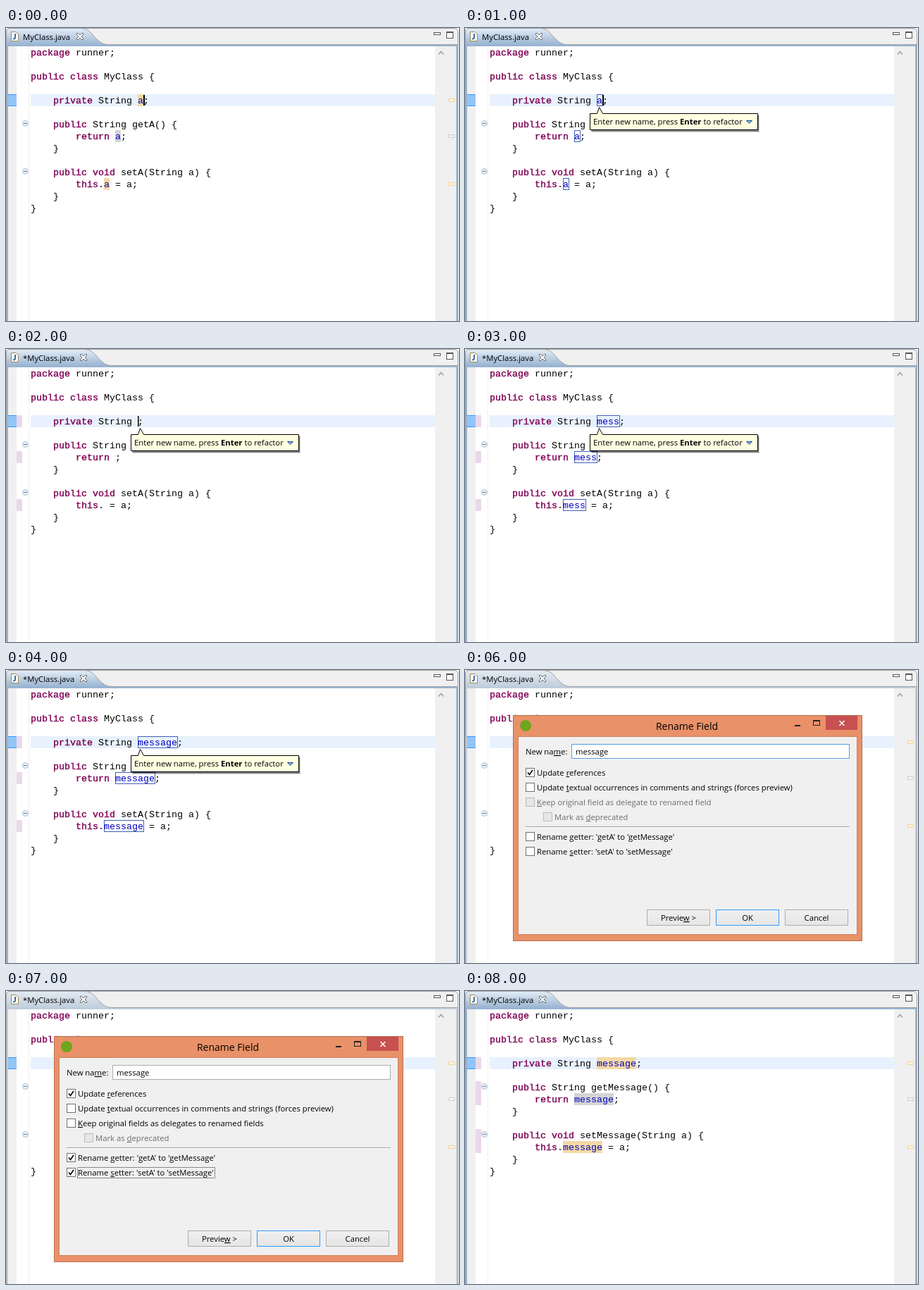
Recreate the animation shown at these times as an HTML page. Size 643x416 px, loop 9 s.

```html
<!DOCTYPE html>
<html lang="en">
<head>
<meta charset="utf-8">
<title>Rename field</title>
<style>
  html, body { margin: 0; width: 100%; height: 100%; overflow: hidden; background: #fff; }
  svg { display: block; width: 643px; height: 416px; }
  text { white-space: pre; }
  .code { font: 13.333px "Liberation Mono", "Courier New", monospace; }
  .kw { fill: #7f0055; stroke: #7f0055; stroke-width: .4px; }
  .field { fill: #0000c0; }
  .ui { font: 11.3px "Open Sans", "Segoe UI", sans-serif; }
</style>
</head>
<body>
<svg id="stage" viewBox="0 0 643 416"></svg>
<script>
const stage = document.getElementById('stage');
const LOOP = 9000, LEFT = 35, TOP = 26, CHAR = 8, LINE = 17;
const KEYWORDS = /\b(package|public|class|private|return|void|this)\b/g;

// '@' stands for the field being renamed
const codeLines = (getter, setter) => [
  'package runner;', '',
  'public class MyClass {', '',
  '    private String @;', '',
  `    public String ${getter}() {`,
  '        return @;',
  '    }', '',
  `    public void ${setter}(String a) {`,
  '        this.@ = a;',
  '    }',
  '}'
];

const base = { name: 'a', getter: 'getA', setter: 'setA', dirty: true, active: true, changed: [] };
const editing = { ...base, boxes: true, tip: true, changed: [4, 7, 11] };
const dialog = { ...base, active: false, marks: true, dialog: true };
const steps = [
  [0, { ...base, dirty: false, marks: true, caret: true }],
  [1000, { ...editing, dirty: false, changed: [], caret: true }],
  [2000, { ...editing, name: '', caret: true }],
  [3000, { ...editing, name: 'mess' }],
  [4000, { ...editing, name: 'message' }],
  [6000, dialog],
  [7000, { ...dialog, accessors: true }],
  [8000, { ...base, name: 'message', getter: 'getMessage', setter: 'setMessage',
           marks: true, changed: [4, 6, 7, 10, 11] }]
];

const lineTop = i => TOP + LINE * i;
const rect = (x, y, w, h, fill, extra = '') =>
  `<rect x="${x}" y="${y}" width="${w}" height="${h}" fill="${fill}" ${extra}/>`;
const frame = (x, y, w, h, fill, stroke, extra = '') =>
  rect(x + .5, y + .5, w - 1, h - 1, fill, `stroke="${stroke}" ${extra}`);
const path = (d, stroke, fill = 'none', width = 1) =>
  `<path d="${d}" fill="${fill}" stroke="${stroke}" stroke-width="${width}"/>`;
const label = (x, y, s, extra = '') => `<text class="ui" x="${x}" y="${y}" ${extra}>${s}</text>`;
// '_' underlines the letter after it
const mnemonic = s => s.replace(/_(.)/, '<tspan text-decoration="underline">$1</tspan>');

const defs = `<defs>
  <linearGradient id="on" x2="0" y2="1"><stop stop-color="#e4edf7"/><stop offset="1" stop-color="#99b4d1"/></linearGradient>
  <linearGradient id="off" x2="0" y2="1"><stop stop-color="#e4ebf3"/><stop offset="1" stop-color="#bfcddb"/></linearGradient>
  <linearGradient id="btn" x2="0" y2="1"><stop stop-color="#f0f0f0"/><stop offset="1" stop-color="#e5e5e5"/></linearGradient>
  <pattern id="check" width="2" height="2" patternUnits="userSpaceOnUse">
    <path d="M0 0h2v2h-2z" fill="#f0f0f0"/><path d="M0 0h1v1h-1zM1 1h1v1h-1z" fill="#3399ff"/>
  </pattern>
</defs>`;

function header(s) {
  const dx = s.dirty ? 5 : 0, rim = s.active ? '#99b4d1' : '#bfcddb';
  const tab = `C${118 + dx} .5 ${122 + dx} 9 ${128 + dx} 15S${138 + dx} 23.5 ${146 + dx} 23.5`;
  const cx = 105 + dx;
  return rect(0, 0, 643, 416, '#fff') +
    path('M.5 417V6Q.5 .5 6 .5H636Q641.5 .5 641.5 6V417', '#a0a0a0', '#f0f0f0') +
    rect(1, 24, 640, 392, rim) +
    path(`M.5 24V6Q.5 .5 6 .5H${106 + dx}${tab}V24Z`, 'none', `url(#${s.active ? 'on' : 'off'})`) +
    path(`M.5 24V6Q.5 .5 6 .5H${106 + dx}${tab}H641`, '#a0a0a0') +
    path('M7.5 5.5H14L17.5 9V18.5H7.5Z', '#9a8a54', '#fff') +
    path('M13 8V13.5Q13 16 10 15.3', '#24609c', 'none', 1.8) +
    label(24, 17, (s.dirty ? '*' : '') + 'MyClass.java') +
    path(`M${cx - 4.5} 7.5h2l2.5 2.5 2.5-2.5h2v2l-2.5 2.5 2.5 2.5v2h-2l-2.5-2.5-2.5 2.5h-2v-2l2.5-2.5-2.5-2.5z`, '#666', '#fff') +
    frame(607, 6, 10, 4, '#fff', '#555') +
    frame(625, 5, 10, 10, '#fff', '#555') + rect(625, 5, 10, 2, '#555');
}

function editor(s) {
  const lines = codeLines(s.getter, s.setter);
  let out = rect(3, TOP, 636, 390, '#fff') + rect(3, TOP, 12, 390, '#f0f0f0') +
    rect(32, TOP, 1, 390, '#f0f0f0') + rect(609, TOP, 30, 390, '#f0f0f0') +
    path('M614 37.5l3.5-4 3.5 4', '#a3a3a3', 'none', 1.7) +
    rect(LEFT, lineTop(4), 574, LINE, '#e8f2fe') +
    rect(3, lineTop(4), 12, LINE, 'url(#check)') +
    rect(3, lineTop(4), 12, 1, '#3399ff') + rect(3, lineTop(5) - 1, 12, 1, '#3399ff');
  for (const i of s.changed) out += rect(15, lineTop(i), 8, LINE, '#ead8ea');
  for (const y of [135.5, 203.5])
    out += `<circle cx="27.5" cy="${y}" r="4" fill="#eef4fa" stroke="#a5bdd3"/>` + path(`M25 ${y}h5`, '#55799c');

  lines.forEach((line, i) => {
    const col = line.indexOf('@'), x = LEFT + CHAR * col, y = lineTop(i), w = CHAR * s.name.length;
    if (col >= 0) {
      const read = i === 7;
      if (s.marks) {
        out += rect(x, y, w, LINE, read ? '#d4d4d4' : '#f4d9a6') +
          frame(628, y + 6, 9, 5, read ? '#f4f4f4' : '#fff3dc', read ? '#cfcfcf' : '#f0d49c');
      }
      if (s.boxes && w) out += frame(x, y, w + 1, LINE, 'none', '#3f62b5');
    }
    const html = line.replace(KEYWORDS, '<tspan class="kw">$1</tspan>')
      .replace('@', `<tspan class="field">${s.name}</tspan>`);
    out += `<text class="code" x="${LEFT}" y="${y + 13}">${html}</text>`;
    if (i === 4 && s.caret) out += rect(x + w, y + 1, s.name ? 2 : 1.5, 15, '#000');
  });
  return out;
}

function tooltip() {
  return rect(180, 124, 238, 24, '#000', 'opacity=".2"') + rect(179, 123, 238, 24, '#000', 'opacity=".35"') +
    path('M177.5 121.5H187.5L190.5 112.5L195.5 121.5H415.5V144.5H177.5Z', '#000', '#ffffe1') +
    label(182, 137, 'Enter new name, press <tspan font-weight="bold">Enter</tspan> to refactor') +
    path('M399.5 131.5H407.5L403.5 135.5Z', '#1f4f94', '#8fb4e0');
}

function checkbox(x, y, text, on, disabled) {
  return frame(x, y, 13, 13, disabled ? '#e6e6e6' : '#fff', disabled ? '#bcbcbc' : '#707070') +
    (on ? path(`M${x + 3} ${y + 6.5}l2.5 3 4.5-6.5`, '#111', 'none', 1.8) : '') +
    label(x + 16, y + 11, mnemonic(text), disabled ? 'fill="#6d6d6d"' : '');
}

function button(x, text, main) {
  return frame(x, 340, 90, 23, 'url(#btn)', main ? '#3399ff' : '#acacac') +
    label(x + 45, 356, mnemonic(text), 'text-anchor="middle"');
}

function renameDialog(all) {
  const keep = all ? '_Keep original fields as delegates to renamed fields'
                   : '_Keep original field as delegate to renamed field';
  return frame(68, 64, 496, 321, '#e99168', '#b5704f') +
    frame(75, 94, 482, 282, '#f0f0f0', '#cf815d') +
    '<circle cx="86" cy="79" r="8" fill="#6fa51f"/>' +
    label(315, 85, 'Rename Field', 'text-anchor="middle" style="font-size:14px"') +
    rect(468, 78, 8, 2, '#222') +
    frame(494, 71, 10, 8, 'none', '#222') + rect(494, 71, 10, 2, '#222') +
    rect(512, 65, 45, 20, '#c75050') + path('M531.5 72l7 7M538.5 72l-7 7', '#fff', 'none', 1.5) +
    label(86, 120, mnemonic('New na_me:')) +
    frame(151, 105, 395, 21, '#fff', all ? '#abadb3' : '#569de5') + label(157, 120, 'message') +
    checkbox(86, 139, 'Update _references', true) +
    checkbox(86, 160, 'Update _textual occurrences in comments and strings (forces preview)') +
    checkbox(86, 181, keep, false, !all) +
    checkbox(111, 202, 'Mark as _deprecated', false, true) +
    rect(86, 222, 460, 1, '#a0a0a0') + rect(86, 223, 460, 1, '#fff') +
    checkbox(86, 230, "Rename _getter: 'getA' to 'getMessage'", all) +
    checkbox(86, 251, "Rename _setter: 'setA' to 'setMessage'", all) +
    (all ? frame(101, 250, 196, 16, 'none', '#222', 'stroke-dasharray="1" stroke-dashoffset=".5"') : '') +
    button(258, 'Previe_w >') + button(356, 'OK', true) + button(454, 'Cancel');
}

let shown;
function draw(now) {
  const t = now % LOOP;
  const state = steps.filter(([start]) => start <= t).pop()[1];
  if (state !== shown) {
    shown = state;
    stage.innerHTML = defs + header(state) + editor(state) +
      (state.tip ? tooltip() : '') + (state.dialog ? renameDialog(state.accessors) : '');
  }
}

const start = performance.now();
function tick() {
  draw(performance.now() - start);
  requestAnimationFrame(tick);
}
tick();
</script>
</body>
</html>
```
